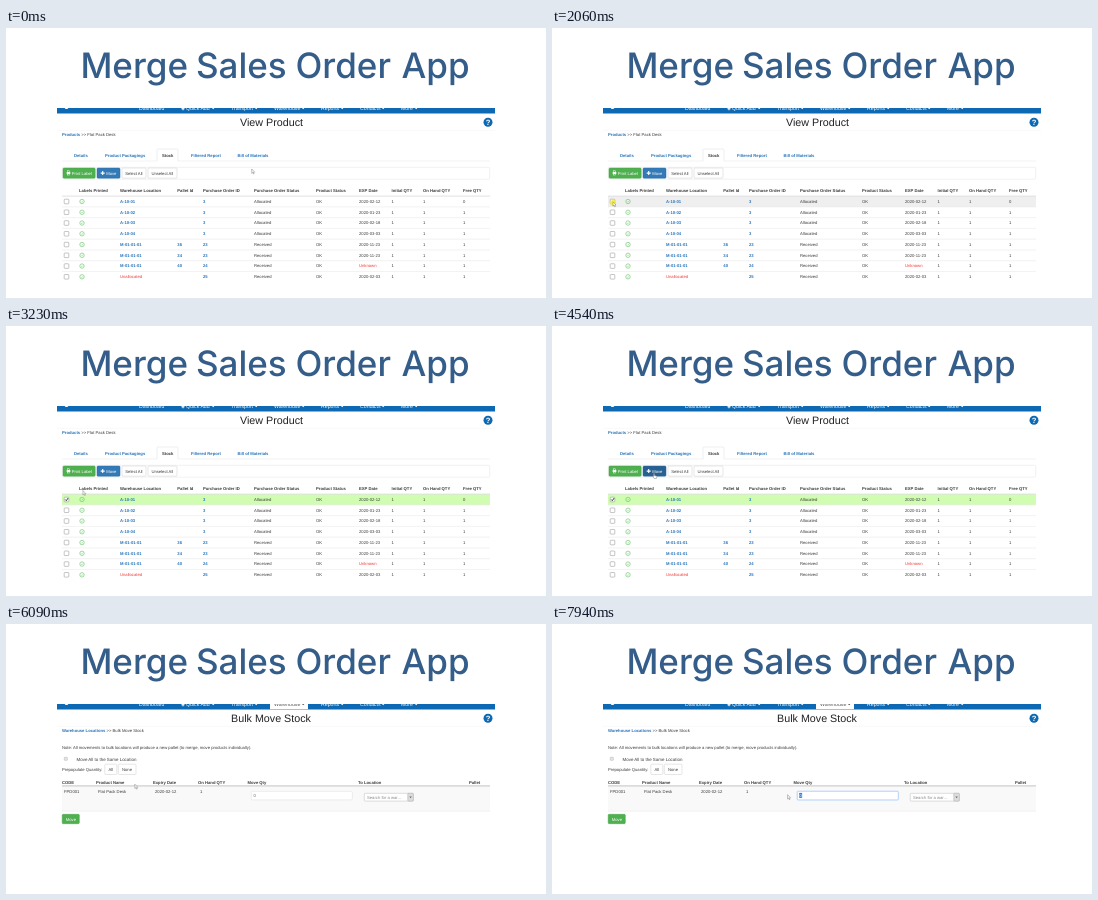
An HTML page for the animation above (8000 ms loop, 540 px wide and 270 px high).

```html
<!DOCTYPE html>
<html lang="en">
<head>
<meta charset="utf-8">
<title>Merge Sales Order App</title>
<style>
  html, body { margin: 0; width: 100%; height: 100%; overflow: hidden; background: #fff; }
  svg { display: block; width: 540px; height: 270px; }
  text { font: 4.2px "Liberation Sans", Arial, sans-serif; fill: #3c3c3c; text-rendering: geometricPrecision; white-space: pre; }
  .b { font-weight: 700; }
  .link { font-weight: 700; fill: #2673ba; }
  .red { fill: #f03a36; }
  .white { fill: #fff; }
  .nav { font-size: 5.2px; fill: #fff; }
  .dark { fill: #555; }
  .head { font-size: 10.72px; fill: #222; text-anchor: middle; }
  .wide { font-size: 4.45px; }
  .pale { fill: #888; }
  .title { font: 550 35px Inter, Roboto, sans-serif; font-optical-sizing: none; fill: #345d8a; }
</style>
</head>
<body>
<svg id="stage" viewBox="0 0 540 270"></svg>
<script>
const LOOP = 8000, STEP = 77, START = 360;
const BLUE = '#0d69b3', GREEN = '#4fb04f';

const text = (x, y, s, cls = '') => `<text x="${x}" y="${y}" class="${cls}">${s}</text>`;
const rect = (x, y, w, h, fill, stroke = 'none', r = 0, id = '') =>
  `<rect id="${id}" x="${x}" y="${y}" width="${w}" height="${h}" rx="${r}" fill="${fill}" stroke="${stroke}" stroke-width=".5"/>`;
const line = (x1, x2, y, color = '#ddd', w = .4) =>
  `<path d="M${x1} ${y}H${x2}" stroke="${color}" stroke-width="${w}"/>`;
const path = (d, fill, extra = '') => `<path d="${d}" fill="${fill}" ${extra}/>`;
const plus = (x, y, s = 2) =>
  path(`M${x - s} ${y}h${2 * s}M${x} ${y - s}v${2 * s}`, 'none', 'stroke="#fff" stroke-width="1.1"');
const button = (x, y, w, h, label, tx, id = '') =>
  rect(x, y, w, h, '#fff', '#ccc', 1, id) + text(tx, y + h / 2 + 1.5, label);

function navBar(active) {
  const items = [['Dashboard', 133, 0], ['Quick Add', 180, 206], ['Transport', 225, 249], ['Warehouse', 268, 296],
    ['Reports', 315, 335], ['Contacts', 354, 376], ['More', 395, 409]];
  let out = rect(51, 79, 438, 6.5, BLUE) + `<ellipse cx="60.5" cy="80" rx="1.8" ry="1" fill="#fff"/>` + plus(177, 80.7, 1.6);
  for (const [label, x, caret] of items) {
    const on = label === active;
    if (on) out += rect(264, 79, 38, 6.2, '#fff');
    out += text(x, 82.3, label, on ? 'nav dark' : 'nav');
    if (caret) out += path(`M${caret} 80h2.4l-1.2 1.3z`, on ? '#555' : '#fff');
  }
  return out;
}

function header(title, cx, active) {
  return navBar(active) + text(cx, 98.2, title, 'head') + line(51, 489, 102.3, '#eee') +
    `<circle cx="482" cy="94.2" r="4.5" fill="${BLUE}"/>` +
    `<text x="482" y="97" style="font-size:7.6px;font-weight:700;fill:#fff;text-anchor:middle">?</text>`;
}

const crumbs = (link, rest) =>
  `<text x="56" y="108.2"><tspan class="link">${link}</tspan> &gt;&gt; ${rest}</text>`;

function stockPage() {
  let out = header('View Product', 265.5) + crumbs('Products', 'Flat Pack Desk');

  out += line(56, 151, 133) + line(172, 484, 133) +
    path('M151 133V122q0-1 1-1h19q1 0 1 1v11', 'none', 'stroke="#ddd" stroke-width=".5"');
  out += text(68, 128.7, 'Details', 'link') + text(99, 128.7, 'Product Packagings', 'link') +
    text(156, 128.7, 'Stock', 'b') + text(185, 128.7, 'Filtered Report', 'link') + text(231.5, 128.7, 'Bill of Materials', 'link');

  out += rect(56.3, 139.3, 427.4, 11.9, '#fff', '#e2e2e2', 1) + rect(57, 140, 32.2, 10.2, GREEN, '#45a045', 1) +
    rect(60.7, 144, 3.6, 2, '#fff') + rect(61.3, 142.8, 2.4, 4.2, 'none', '#fff') + text(65.8, 146.6, 'Print Label', 'white') +
    rect(91, 140, 23, 10.2, '#337ab7', '#2e6da4', 1, 'moveBtn') + plus(96.7, 145.1) + text(100.2, 146.6, 'Move', 'white') +
    button(116, 140, 24, 10.2, 'Select All', 119.3) + button(142, 140, 29, 10.2, 'Unselect All', 145.4);

  const cols = [73, 114, 171.3, 197, 248, 310, 353, 385.5, 417, 457];
  const names = ['Labels Printed', 'Warehouse Location', 'Pallet Id', 'Purchase Order ID', 'Purchase Order Status',
    'Product Status', 'EXP Date', 'Initial QTY', 'On Hand QTY', 'Free QTY'];
  names.forEach((n, i) => out += text(cols[i], 163.7, n, 'b'));
  out += rect(56, 168.2, 428, 10.6, '#fff', 'none', 0, 'firstRow') + line(56, 484, 168.1, '#d4d4d4', .7);

  const rows = [
    ['A-10-01', '', 3, '02-12'], ['A-10-02', '', 3, '01-23'], ['A-10-03', '', 3, '02-18'], ['A-10-04', '', 3, '03-03'],
    ['M-01-01-01', 36, 23, '11-23'], ['M-01-01-01', 34, 23, '11-23'], ['M-01-01-01', 40, 24, ''], ['Unallocated', '', 25, '02-03']];
  rows.forEach(([place, pallet, order, date], i) => {
    const y = 173.5 + 10.76 * i, b = y + 1.4;
    out += rect(58.2, y - 2.3, 4.6, 4.6, '#fff', '#8a8a8a', .7) +
      `<circle cx="76" cy="${y}" r="2.2" fill="none" stroke="#74cb74" stroke-width=".7"/>` +
      path(`M75 ${y}l.8 .8 1.3-1.5`, 'none', 'stroke="#74cb74" stroke-width=".5"') +
      text(114, b, place, i === 7 ? 'red' : 'link') + text(171.3, b, pallet, 'link') + text(197, b, order, 'link') +
      text(248, b, i < 4 ? 'Allocated' : 'Received') + text(310, b, 'OK') +
      text(353, b, date ? '2020-' + date : 'Unknown', date ? '' : 'red') +
      text(385.5, b, 1) + text(417, b, 1) + text(457, b, i ? 1 : 0);
    if (i < 7) out += line(56, 484, y + 5.4);
  });
  return out + path('M59.2 173.5l1.1 1.2 1.8-2.6', 'none', 'id="tick" stroke="#222" stroke-width=".9"');
}

function movePage() {
  let out = header('Bulk Move Stock', 265, 'Warehouse') + crumbs('Warehouse Locations', 'Bulk Move Stock') +
    text(56, 125.2, 'Note: All movements to bulk locations will produce a new pallet (to merge, move products individually).') +
    rect(58.3, 133.3, 3, 3, '#e8e8e8', '#aaa', .4) + text(70.5, 136.6, 'Move All to the Same Location', 'wide') +
    text(56, 146.7, 'Prepopulate Quantity:') +
    button(98.8, 140.2, 12, 10.3, 'All', 102.4, 'allBtn') + button(112.3, 140.2, 17.7, 10.3, 'None', 116);

  const heads = [[56, 'CODE'], [90, 'Product Name'], [147, 'Expiry Date'], [192, 'On Hand QTY'],
    [241.5, 'Move Qty'], [352, 'To Location'], [463, 'Pallet']];
  heads.forEach(([x, n]) => out += text(x, 160.3, n, 'b'));
  out += rect(56, 162, 428, 25.2, '#f9f9f9') + line(56, 484, 161.9, '#b4b4b4', .8) + line(56, 484, 187.2);
  [[58, 'FPD001'], [92, 'Flat Pack Desk'], [149, '2020-02-12'], [194, '1']].forEach(([x, s]) => out += text(x, 168.6, s));

  out += rect(244.8, 166.9, 102, 9.4, 'none', '#d6e8fa', 1.2, 'glow') +
    rect(245.3, 167.3, 101, 8.6, '#fff', '#d2dde0', 1, 'field') +
    rect(247.2, 168.9, 2.9, 5, '#2f80e0', 'none', 0, 'selection') +
    `<text id="qty" x="247.6" y="173">0</text>` +
    rect(358.3, 169.3, 49, 7.8, '#fff', '#bbb', .8) + text(361, 174.7, 'Search for a war...', 'pale') +
    rect(401.8, 169.3, 5.5, 7.8, '#ddd', '#aaa', .6) + path('M403.4 172.4h2.4l-1.2 1.8z', '#666') +
    rect(56.2, 190.3, 17.1, 9.4, GREEN, '#45a045', 1) + text(59.8, 196.5, 'Move', 'white');
  return out;
}

const outline = 'stroke="#666" stroke-width=".4"';
document.getElementById('stage').innerHTML =
  `<defs><clipPath id="screen"><rect x="51" y="80" width="438" height="183"/></clipPath></defs>` +
  rect(0, 0, 540, 270, '#fff') +
  text(74.4, 49.6, 'Merge', 'title') + text(190, 49.6, 'Sales', 'title') +
  text(289.5, 49.6, 'Order', 'title') + text(395.5, 49.6, 'App', 'title') +
  `<g clip-path="url(#screen)"><g id="stock">${stockPage()}</g><g id="move">${movePage()}</g>
  <g id="pointer"><circle id="click" cx=".2" cy="1.2" r="2.9" fill="#f7ee2e" opacity=".9"/>
  ${path('M0 0V4.3L1 3.4 1.7 5 2.4 4.7 1.7 3.2H3z', '#fff', 'id="arrow" ' + outline)}
  ${path('M0 .3q.5-.6 .9 0V2l2 .5q.5 .2 .3 1L2.8 5H.6L-.9 3.1q.1-.6 .9 0z', '#fff', 'id="hand" ' + outline)}
  ${path('M-.6-.6H.8M.1-.6V3.6M-.6 3.6H.8', 'none', 'id="beam" stroke="#777" stroke-width=".4" opacity=".6"')}
  </g></g>`;

// time, x, y of the pointer tip
const track = [
  [0, 245.7, 141], [START - STEP, 245.7, 141], [1140, 106, 173.6], [1680, 61, 173.8], [2453, 61, 173.8],
  [2770, 63.5, 171.8], [2993, 63.5, 171.8], [3230, 78.2, 163.8], [3840, 102.3, 147.8], [3930, 101.6, 147.5],
  [5703, 101.6, 147.5], [6090, 131.3, 161.3], [6550, 259, 177.5], [6940, 274, 172], [7173, 274, 172],
  [7940, 233.8, 170.6], [LOOP, 233.8, 170.6]];

function pointerAt(t) {
  const i = Math.max(1, track.findIndex(k => k[0] >= t));
  const [t0, x0, y0] = track[i - 1], [t1, x1, y1] = track[i];
  const p = Math.min(1, (t - t0) / (t1 - t0));
  return [x0 + (x1 - x0) * p, y0 + (y1 - y0) * p];
}

const el = id => document.getElementById(id);
const show = (id, on) => el(id).setAttribute('display', on ? 'inline' : 'none');
const fill = (id, c) => el(id).setAttribute('fill', c);
const within = (v, a, b) => v >= a && v < b;

function draw(t) {
  const tick = START + STEP * Math.floor((t - START) / STEP);
  const [x, y] = pointerAt(Math.max(0, tick));
  const second = t >= 4940, checked = t >= 2150, focused = t >= 6940;
  show('stock', !second);
  show('move', second);

  const overRow = within(y, 168.2, 178.8);
  fill('firstRow', checked ? '#d0fdb2' : overRow ? '#efefef' : '#fff');
  show('tick', checked);
  const overMove = !second && within(x, 91, 114) && within(y, 140, 150.3);
  const pressed = within(t, 4390, 4540);
  fill('moveBtn', pressed ? '#204d74' : overMove ? '#286090' : '#337ab7');

  const overAll = second && within(x, 98.8, 110.8) && within(y, 140, 150.5);
  fill('allBtn', overAll ? '#e6e6e6' : '#fff');
  const overField = second && within(x, 245, 347) && within(y, 167, 176);
  const selected = focused && x < 248;
  show('glow', focused);
  el('field').setAttribute('stroke', focused ? '#78aeea' : '#d2dde0');
  show('selection', selected);
  el('qty').style.fill = selected ? '#fff' : '#666';

  show('click', within(t, 1990, 2150) || pressed || within(t, 6940, 7860));
  show('hand', overMove);
  show('beam', overField);
  show('arrow', !overMove && !overField);
  el('pointer').setAttribute('transform', `translate(${x.toFixed(2)} ${y.toFixed(2)})`);
}

const began = performance.now();
function frame() {
  draw((performance.now() - began) % LOOP);
  requestAnimationFrame(frame);
}
frame();
</script>
</body>
</html>
```
